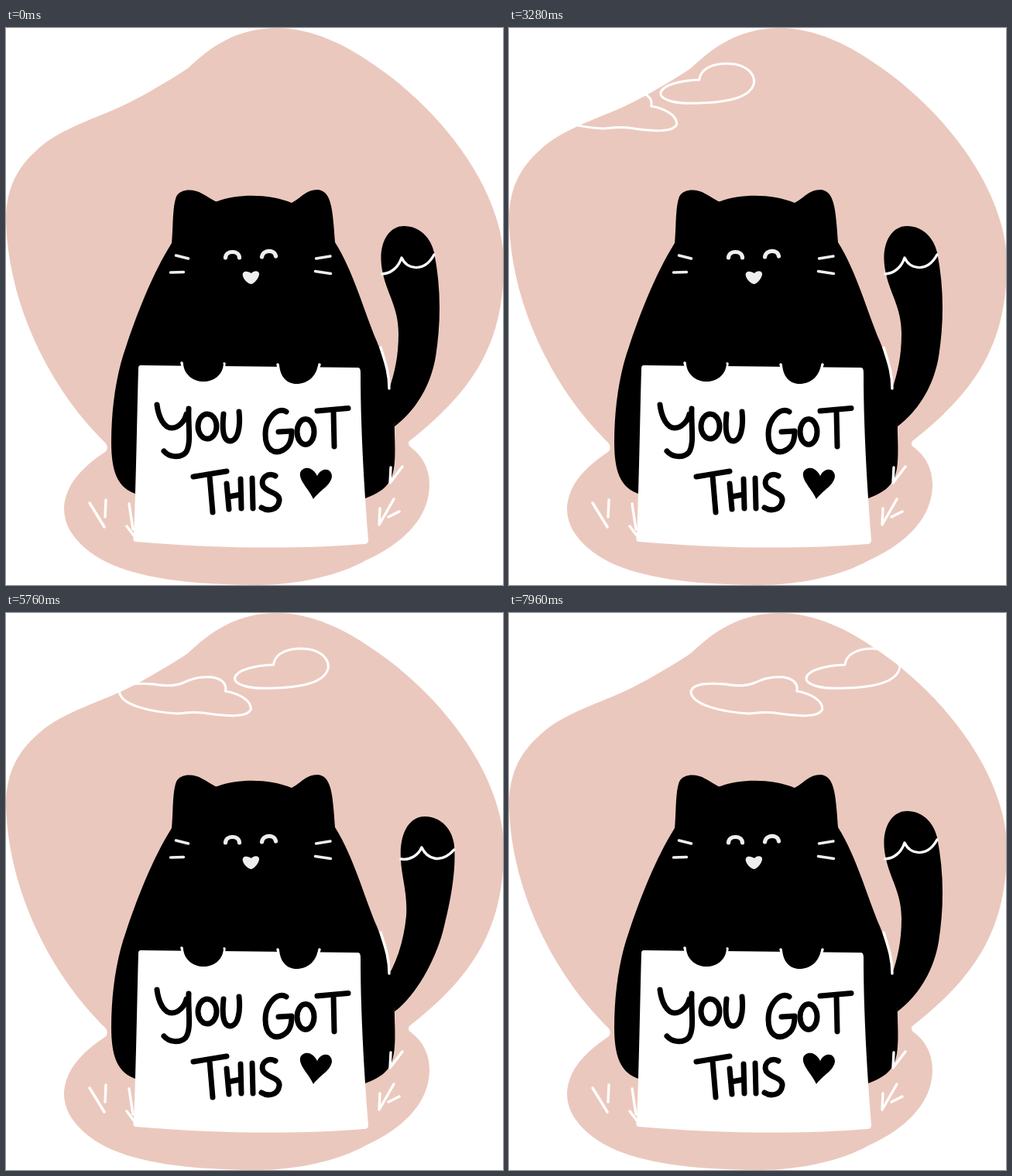
Write an HTML page that moves like this. It is 642 px wide and 720 px high and loops after 8000 ms.

```html
<!DOCTYPE html>
<html lang="en">
<head>
<meta charset="utf-8">
<title>Encouraging cat</title>
<style>
  html, body { margin: 0; width: 100%; height: 100%; overflow: hidden; background: #fff; }
  svg { display: block; width: 100%; height: 100%; }
  .line { fill: none; stroke: #fff; stroke-width: 3.4; stroke-linecap: round; stroke-linejoin: round; }
  .face { stroke: #eee; }
  .ink { stroke: #000; stroke-width: 7; }
  #clouds { stroke-width: 3; }
  #eyes { stroke-width: 5.2; }
</style>
</head>
<body>
<svg viewBox="0 0 642 720">
  <path fill="#ebc8bd" d="M350 0C396 0 440 23 470 44C555 99 643 205 643 305C643 410 602 470 521 534Q518 538 523 542C538 553 547 570 547 590C547 637 507 669 465 688C430 708 375 720 325 720C225 720 143 708 103 673C83 655 75 640 75 620C77 590 98 568 128 548Q133 544 129 537C50 460 0 345 0 243C2 196 22 172 50 149C85 124 120 116 160 96C180 86 214 66 235 52C265 23 300 0 350 0Z"/>

  <g id="clouds" class="line">
    <path d="M384 67C386 51 404 46 420 46C441 46 455 56 455 70C452 89 422 96 385 97C350 99 334 92 334 84C337 73 360 68 384 67Z"/>
    <path d="M322 101C340 104 355 113 355 124C351 136 322 133 300 130C282 127 272 129 260 130C225 128 187 119 185 102C188 89 215 91 230 92C245 95 256 95 268 90C280 84 294 82 305 83C318 85 324 92 322 101Z"/>
  </g>

  <path id="tail"/>
  <path id="tailBand" class="line"/>
  <path d="M214 278C225 240 250 228 273 224C300 214 340 214 369 226C381 220 387 209 403 209C422 211 422 240 425 277C449 315 462 365 479 405C493 440 502 475 502 525C504 580 501 594 464 608L170 603C143 595 136 572 136 535C136 490 143 445 155 412C169 370 189 318 214 278Z"/>
  <path id="ear"/>
  <path class="line" d="M484 413C490 432 495 446 495 466"/>

  <g class="line face">
    <path d="M219.500 294L235.500 298M212.500 316L229.500 315.500M400.500 298L419 295M399.500 314.500L419.500 317.500"/>
    <path id="eyes" d="M283.500 297C284 287 301 287 301.500 297M330.500 296C332 286 347 286 348.500 295"/>
  </g>
  <path fill="#eee" d="M306 317C308 313 314 315 317 317C320 314 325 313 327 317C328 322 320 331 317 331C312 331 304 322 306 317Z"/>

  <path fill="#fff" d="M174 436L455 439Q458 439 458 446C458 520 463 600 468 662Q468 667 463 667C380 674 270 673 167 664Q163 663 165 656C168 590 169 510 171 440Q171 436 174 436Z"/>
  <path class="line" d="M227 433L229 440M282 434L281 440M351 435L353 441M405 435L403 441"/>
  <path d="M229 434C230 449 243 457 255 457C268 457 280 449 281 434ZM353 435C354 451 363 460 375 460C390 460 401 450 403 435Z"/>

  <g class="line ink" role="img" aria-label="You got this">
    <path d="M195 487C197 503 204 517 214 517C223 517 231 508 233 499M236 492C235 515 240 538 232 549C224 557 210 554 204 547"/>
    <ellipse cx="260" cy="515" rx="12" ry="16"/>
    <path d="M281 499C279 518 280 534 290 534C300 533 303 515 301 496"/>
    <path d="M362 496C350 489 335 506 335 525C335 546 347 551 357 546C367 541 369 532 369 521L352 522"/>
    <ellipse cx="387" cy="522" rx="11" ry="16.500"/>
    <path d="M402 495L442 491.500M423 495L424 541"/>
    <path d="M242 580L285 573M263 579L267 626M285 589L288 622M303 583L304 621M287 606L303 603M318 582L319 621"/>
    <path d="M348 579C338 574 328 582 332 592C337 601 354 600 353 611C351 624 338 625 330 620"/>
  </g>
  <path d="M397 609C392 597 378 585 380 575C383 566 396 566 402 579C408 567 421 569 421 580C419 592 406 597 397 609Z"/>

  <path class="line" d="M108 614L127 645M129 610L128 632M159 615L164 648M156 644L165 656M497 568L496 588L512 567M501 609L482 642L483 621M494 632L508 625"/>
</svg>

<script>
const LOOP = 8000;
const CLOUD_SPEED = 0.0402; // px per ms
const part = id => document.getElementById(id);

// Each shape is a resting path followed by poses with matching commands.
const shapes = {
  tail: [
    'M495 467C502 445 507 425 507 395C507 362 493 345 487 318C478 280 494 256 514 256C535 256 549 272 553 290C562 335 562 380 555 425C548 465 528 495 502 515Z',
    'M495 467C505 441 512 420 513 390C515 357 510 350 511 314C510 285 528 266 553 266C573 266 585 282 583 302C579 335 566 390 553 430C543 470 522 497 502 515Z',
    'M495 467C506 447 514 422 517 392C519 362 511 342 510 318C508 283 522 263 541 263C562 263 577 280 579 300C582 335 573 377 566 405C557 445 530 495 502 515Z'
  ],
  tailBand: [
    'M486 318C498 317 507 309 511 297C519 314 541 315 553 293',
    'M511 313C525 315 537 312 542 301C548 318 563 325 582 314',
    'M510 318C522 320 533 313 537 303C544 318 562 325 579 306'
  ],
  ear: [
    'M214 279C216 255 215 231 220 218C226 207 243 208 253 214C261 218 267 223 273 225L280 279Z',
    'M214 279C215 255 211 233 216 221C222 213 240 215 250 217C260 219 266 224 272 226L280 279Z'
  ]
};

function morph(id, ...weights) {
  const [rest, ...poses] = shapes[id];
  const ends = poses.map(pose => pose.match(/\d+/g));
  let i = 0;
  part(id).setAttribute('d', rest.replace(/\d+/g, n => {
    const offset = weights.reduce((sum, weight, k) => sum + weight * (ends[k][i] - n), 0);
    i++;
    return (+n + offset).toFixed(2);
  }));
}

// Eased interpolation through [time, value] keys.
function track(keys, t) {
  const next = keys.findIndex(key => key[0] > t);
  if (next < 1) return keys[next < 0 ? keys.length - 1 : 0][1];
  const [t0, v0] = keys[next - 1], [t1, v1] = keys[next];
  return v0 + (v1 - v0) * (1 - Math.cos(Math.PI * (t - t0) / (t1 - t0))) / 2;
}

const swing = [[3320, 0], [4120, 1.12], [4440, 1], [5600, 0]];
const bend = [[4440, 0], [5700, 1], [6720, 0.68], [7540, 0]];
const twitch = [[400, 0], [800, 1], [1150, 0], [1520, 1], [1900, 0]];
const blink = [[1960, 1], [2080, 0.05], [2200, 1], [4320, 1], [4440, 0.05], [4560, 1]];

function draw(now) {
  const t = now % LOOP;
  const tailPose = [track(swing, t), track(bend, t)];
  part('clouds').setAttribute('transform', `translate(${(t - 6720) * CLOUD_SPEED})`);
  morph('tail', ...tailPose);
  morph('tailBand', ...tailPose);
  morph('ear', track(twitch, t));
  part('eyes').setAttribute('opacity', track(blink, t));
}

let start;
function frame(now) {
  start ??= now;
  draw(now - start);
  requestAnimationFrame(frame);
}
draw(0);
requestAnimationFrame(frame);
</script>
</body>
</html>
```
